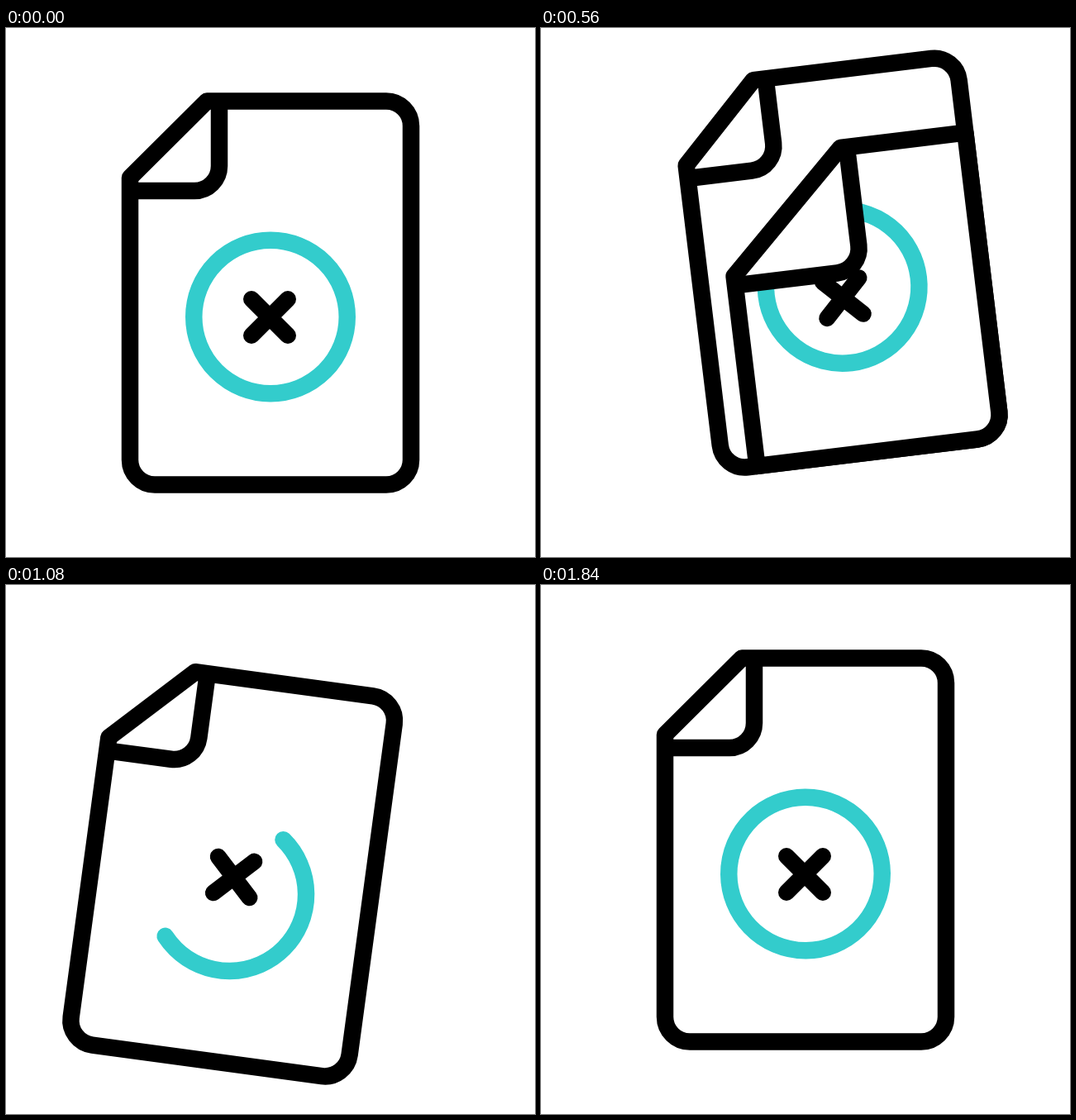
Write an HTML page with a canvas that moves like this. It is 640 px wide and 640 px high and loops after 2 s.

```html
<!DOCTYPE html>
<html lang="en">
<head>
<meta charset="utf-8">
<title>Page reset</title>
<style>
  html, body { margin: 0; width: 100%; height: 100%; overflow: hidden; background: #fff; }
  canvas { display: block; width: 640px; height: 640px; }
</style>
</head>
<body>
<canvas width="640" height="640"></canvas>
<script>
const ctx = document.querySelector('canvas').getContext('2d');
const LOOP = 2000, STEP = 40;
const RIGHT = 490, BOTTOM = 552.5, LINE = 20.5, RADIUS = 30;
const INK = '#000', TEAL = '#33cccc';
const RAD = Math.PI / 180;

const mix = (a, b, p) => a + (b - a) * p;
const span = (t, from, to) => Math.min(1, Math.max(0, (t - from) / (to - from)));

// Progress along cubic-bezier(x1, 0, x2, 1); the default is a plain smoothstep.
function ease(t, from, to, x1 = 1 / 3, x2 = 2 / 3) {
  const u = span(t, from, to);
  let lo = 0, hi = 1;
  for (let i = 0; i < 24; i++) {
    const s = (lo + hi) / 2, v = 1 - s;
    if (3 * v * v * s * x1 + 3 * v * s * s * x2 + s * s * s < u) lo = s;
    else hi = s;
  }
  return lo * lo * (3 - 2 * lo);
}

// The page swings around a point above the stage: left, right, then to rest.
const PIVOT_Y = -230;
const LEFT_SWING = { angle: -7.07, x: -23.3, y: 6.3 };
const RIGHT_SWING = { angle: 8.05, x: 32.1, y: -13.4 };

function swing(t) {
  const a = ease(t, 80, 640, 0.4, 0.4);
  const b = ease(t, 640, 1200, 0.55, 0.1);
  const c = ease(t, 1200, 1840, 0.5, 0.1);
  const at = k => mix(mix(LEFT_SWING[k] * a, RIGHT_SWING[k], b), 0, c);
  ctx.translate(at('x'), at('y') + PIVOT_Y);
  ctx.rotate(at('angle') * RAD);
  ctx.translate(0, -PIVOT_Y);
}

// Fold line from (ax, ay) on top to (bx, by) on the left; (fx, fy) is the flap corner.
const CLOSED = { ax: 243, ay: 88.5, bx: 150, by: 181, fx: 258, fy: 197 };
const HALF = { ax: 447, ay: 291, bx: 239, by: 483, fx: 446.5, fy: 488.6 };
const GONE = { ax: 525, ay: 552, bx: 475, by: 607, fx: 525, fy: 607 };

function fold(p) {
  const shape = { r: Math.max(0, RADIUS - 200 * p) };
  for (const k in CLOSED) {
    const v = p < 1 ? mix(CLOSED[k], HALF[k], p) : mix(HALF[k], GONE[k], p - 1);
    shape[k] = Math.min(v, k[1] === 'x' ? RIGHT : BOTTOM);
  }
  return shape;
}

function stroke(color, width = LINE) {
  ctx.strokeStyle = color;
  ctx.lineWidth = width;
  ctx.stroke();
}

function outline(s) {
  ctx.beginPath();
  ctx.moveTo(s.bx, s.by);
  ctx.lineTo(s.ax, s.ay);
  ctx.arcTo(RIGHT, s.ay, RIGHT, BOTTOM, s.r);
  ctx.arcTo(RIGHT, BOTTOM, s.bx, BOTTOM, RADIUS);
  ctx.arcTo(s.bx, BOTTOM, s.bx, s.by, s.r);
  ctx.closePath();
}

function flapEdge(s) {
  ctx.beginPath();
  ctx.moveTo(s.fx, s.ay);
  ctx.arcTo(s.fx, s.fy, s.bx, s.fy, RADIUS);
  ctx.lineTo(s.bx, s.fy);
}

function drawPage(s, drawMark) {
  ctx.fillStyle = '#fff';
  ctx.lineJoin = 'round';
  outline(s);
  ctx.fill();
  ctx.save();
  ctx.clip();
  drawMark();
  ctx.restore();

  ctx.lineCap = 'butt';
  flapEdge(s);
  ctx.lineTo(s.bx, s.by);
  ctx.lineTo(s.ax, s.ay);
  ctx.fill();
  flapEdge(s);
  stroke(INK);
  outline(s);
  stroke(INK);
}

function drawRing(from, sweep) {
  if (sweep <= 0) return;
  ctx.lineCap = 'round';
  ctx.beginPath();
  ctx.arc(320, 349.5, 92.75, from * RAD, (from + sweep) * RAD);
  stroke(TEAL);
}

function drawCross(x, y, size, turn) {
  if (size <= 0) return;
  ctx.save();
  ctx.translate(319 + x, 350 + y);
  ctx.rotate(turn * RAD);
  ctx.scale(size, size);
  ctx.lineCap = 'round';
  ctx.beginPath();
  for (const side of [-22, 22]) {
    ctx.moveTo(side, -22);
    ctx.lineTo(-side, 22);
  }
  stroke(INK, 20);
  ctx.restore();
}

function drawOldMark(t) {
  drawRing(0, 360);
  drawCross(0, 14 * ease(t, 80, 640), 1, 0);
}

function drawNewMark(t) {
  drawRing(158 + 360 * ease(t, 755, 1490), 360 * ease(t, 620, 1500));
  const hop = Math.sin(Math.PI * span(t, 880, 1360));
  drawCross(3.6 * hop, -22.5 * hop, ease(t, 880, 1040),
    180 * ease(t, 1080, 1800, 0.4, 0.2));
}

function draw(t) {
  const peel = 2 * ease(t, 289, 1299, 0.4, 0.3);
  ctx.clearRect(0, 0, 640, 640);
  ctx.save();
  swing(t);
  if (peel > 0) drawPage(fold(0), () => drawNewMark(t));
  if (peel < 1.9) {
    if (peel > 1) {
      ctx.beginPath();
      ctx.roundRect(139.75, 78.25, 360.5, 484.5, 40);
      ctx.clip();
    }
    drawPage(fold(peel), () => drawOldMark(t));
  }
  ctx.restore();
}

const start = performance.now();
function tick() {
  const t = (performance.now() - start) % LOOP;
  draw(Math.floor(t / STEP) * STEP);
  requestAnimationFrame(tick);
}
tick();
</script>
</body>
</html>
```
